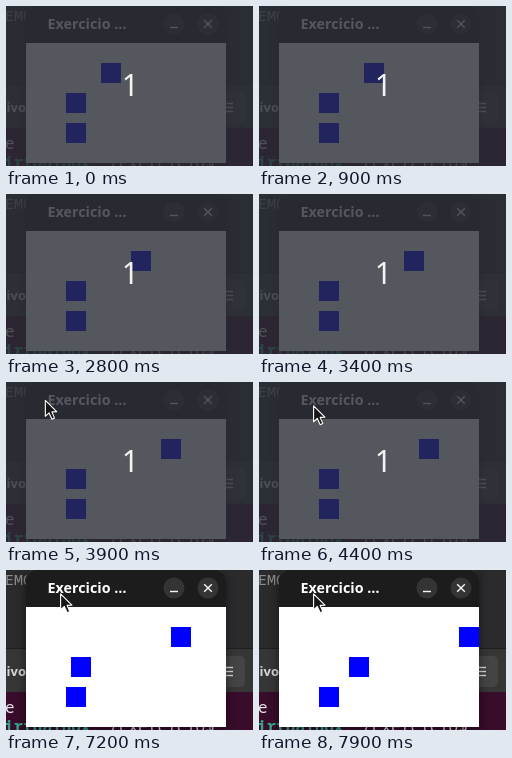
Recreate the animation shown at these times as an HTML page with a canvas. Size 247 by 160 pixels, loop 8000 ms.

```html
<!DOCTYPE html>
<html lang="pt">
<head>
<meta charset="utf-8">
<title>Exercicio</title>
<style>
  html, body { margin: 0; width: 100%; height: 100%; overflow: hidden; background: #2b2b2e; }
  canvas { display: block; width: 247px; height: 160px; }
</style>
</head>
<body>
<canvas id="stage"></canvas>
<script>
const W = 247, H = 160, LOOP = 8000, TICK = 100, BRIGHT_AT = 4500;
const STEP = 5, SIZE = 20, SQUARE = '#0000ff';
const SANS = '"Noto Sans", sans-serif';
const MONO = '"Noto Sans Mono", monospace';

const canvas = document.getElementById('stage');
const ctx = canvas.getContext('2d');
const ratio = window.devicePixelRatio || 1;
canvas.width = W * ratio;
canvas.height = H * ratio;
ctx.scale(ratio, ratio);

// Number of steps taken by time t in a run of evenly spaced steps
function run(t, start, count, gap = TICK) {
  return Math.max(0, Math.min(count, Math.floor((t - start) / gap) + 1));
}

// A steady walk, sped up by short catch-up bursts
function topX(t) {
  const steps = run(t, 400, 9, 500) + run(t, 2800, 3) + run(t, 3800, 1)
    + run(t, 7200, 2) + 2 * run(t, 7700, 3);
  return 95 + STEP * steps;
}

function midX(t) {
  return 60 + STEP * (run(t, 7200, 1) + run(t, 7700, 5, TICK / 2));
}

// Glides in from the left edge along a shallow arc
function pointerAt(t) {
  const p = Math.max(0, Math.min(1, (t - 3700) / 400));
  return [-7 + 61 * (1 - (1 - p) ** 2), 29 - 6 * p - 34 * p * (1 - p)];
}

function rect(x, y, w, h, color) {
  ctx.fillStyle = color;
  ctx.fillRect(x, y, w, h);
}

function rounded(x, y, w, h, radii, color) {
  ctx.beginPath();
  ctx.roundRect(x, y, w, h, radii);
  ctx.fillStyle = color;
  ctx.fill();
}

function text(str, x, y, font, color, align = 'left') {
  ctx.font = font;
  ctx.textAlign = align;
  ctx.fillStyle = color;
  ctx.fillText(str, x, y);
}

function line(x1, y1, x2, y2, color, width = 1.4) {
  ctx.beginPath();
  ctx.moveTo(x1, y1);
  ctx.lineTo(x2, y2);
  ctx.strokeStyle = color;
  ctx.lineWidth = width;
  ctx.stroke();
}

function drawDesktop() {
  rect(0, 0, W, H, '#2b2b2e');
  text('EMO', -1, 15, `15px ${MONO}`, '#8c8c8c');

  rect(0, 78, W, 44, '#363636');
  rect(0, 78, W, 1, '#1e1e1e');
  text('@ivo', 20, 106, `bold 13px ${SANS}`, '#d6d6d6', 'right');
  rounded(206, 86, 33, 31, 5, '#444');
  for (let i = 0; i < 3; i++) line(218, 97.5 + 4 * i, 227, 97.5 + 4 * i, '#d6d6d6');

  rect(0, 122, W, 38, '#380c2a');
  text('e', -1, 143, `16px ${MONO}`, '#e8e4e6');
  text('irtualBox', -2, 162, `bold 16px ${MONO}`, '#35a58a');
  text(':~/Exercicio$', 84, 162, `16px ${MONO}`, '#e8e4e6');
}

function drawWindow(t) {
  const corners = [10, 10, 0, 0];
  ctx.save();
  ctx.shadowColor = 'rgba(0,0,0,.5)';
  ctx.shadowBlur = 10 * ratio;
  ctx.shadowOffsetY = 2 * ratio;
  rounded(20, -1, 200, 158, corners, '#343434');
  ctx.restore();
  rounded(20, 0, 200, 37, corners, '#1c1c1c');
  text('Exercicio …', 41.6, 23, `bold 14.3px ${SANS}`, '#fff');

  for (const x of [168, 202]) rounded(x - 10.5, 7.5, 21, 21, 10.5, '#343434');
  line(164, 21.5, 172, 21.5, '#f4f4f4');
  line(198.2, 14.2, 205.8, 21.8, '#f4f4f4');
  line(205.8, 14.2, 198.2, 21.8, '#f4f4f4');

  rect(20, 37, 200, 120, '#fff');
  [topX(t), midX(t), 60].forEach((x, i) => rect(x, 57 + 30 * i, SIZE, SIZE, SQUARE));
}

function drawCountdown() {
  rect(0, 0, W, H, 'rgba(42,45,53,.8)');
  text('1', 124.3, 90, `30px ${SANS}`, 'rgba(255,255,255,.93)', 'center');
}

function drawPointer([x, y]) {
  const arrow = [[0, 0], [0, 16], [3.7, 12.6], [6.6, 19], [9.2, 17.8], [6.5, 11.6], [11.3, 11.4]];
  ctx.beginPath();
  for (const [dx, dy] of arrow) ctx.lineTo(x + 0.6 + dx, y + 0.8 + dy);
  ctx.closePath();
  ctx.fillStyle = '#161616';
  ctx.fill();
  ctx.strokeStyle = '#fff';
  ctx.lineWidth = 1.1;
  ctx.lineJoin = 'round';
  ctx.stroke();
}

function frame(now) {
  const t = Math.floor((now % LOOP) / TICK) * TICK;
  drawDesktop();
  drawWindow(t);
  if (t < BRIGHT_AT) drawCountdown();
  if (t >= 3600) drawPointer(pointerAt(t));
  requestAnimationFrame(frame);
}
requestAnimationFrame(frame);
</script>
</body>
</html>
```
